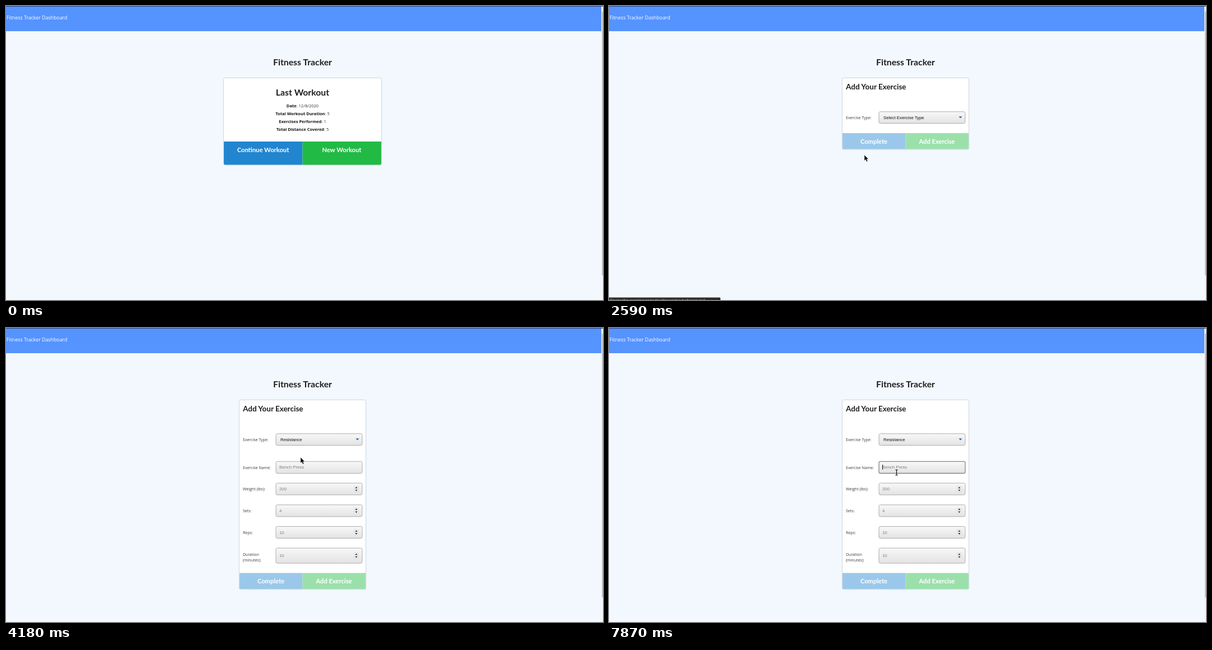
These frames come from a looping animation (1066x525 px, 8 s). An HTML page:

```html
<!DOCTYPE html>
<html lang="en">
<head>
<meta charset="utf-8">
<title>Fitness Tracker</title>
<style>
  html, body { margin: 0; width: 100%; height: 100%; overflow: hidden; background: #f3f8ff; }
  svg { display: block; width: 1066px; height: 525px; }
  .ui { font-family: "Open Sans", "Noto Sans", sans-serif; }
  .head { font-family: Lato, sans-serif; font-weight: 700; fill: #1d1e1f; }
  .field { font-family: "Liberation Sans", Arial, sans-serif; font-size: 7.8px; fill: #808080; }
  .button { font-size: 11.2px; fill: #fff; }
  .mid { text-anchor: middle; }
  .info { font-size: 7.5px; fill: #333; }
  .info tspan { font-weight: 700; fill: #151515; }
  .label { font-size: 7px; fill: #3a3a3a; }
  .card { fill: #fff; filter: drop-shadow(0 .8px 1.3px rgba(60, 70, 85, .48)); }
</style>
</head>
<body>
<svg id="stage" viewBox="0 0 1066 525" xmlns="http://www.w3.org/2000/svg"></svg>
<script>
const LOOP = 8000;
const stage = document.getElementById('stage');

const rect = (x, y, w, h, fill, extra = '') =>
  `<rect x="${x}" y="${y}" width="${w}" height="${h}" fill="${fill}" ${extra}/>`;
const text = (x, y, cls, content, extra = '') =>
  `<text x="${x}" y="${y}" class="${cls}" ${extra}>${content}</text>`;
const head = (x, y, size, content, cls = '') =>
  text(x, y, 'head ' + cls, content, `font-size="${size}"`);
const info = (y, name, value) =>
  text(529.5, y, 'ui info mid', `<tspan>${name}</tspan>: ${value}`);
const label = (y, content) => text(423, y, 'ui label', content);
const box = (y, h, id = '') =>
  rect(482, y, 154, h, 'url(#field)', `rx="2.5" stroke="#acacac" stroke-width="1" ${id}`);
const button = (x, y, content) => text(x, y, 'head button mid', content);

function spinner(y) {
  return rect(621.5, y - 5, 8, 10, '#f0f0f0', 'stroke="#cfcfcf" stroke-width=".5"') +
    `<path d="M623.3 ${y - 1.2}h4.4l-2.2-2.8zM623.3 ${y + 1.2}h4.4l-2.2 2.8z" fill="#333"/>`;
}

function numberRow(name, value, y, h, labelY) {
  const c = y + h / 2;
  return label(labelY, name) + box(y, h) + text(488, c + 2.6, 'field', value) + spinner(c);
}

function formButtons(y) {
  return rect(417, y, 112.5, 28.5, '#9bc8ea') + rect(529.5, y, 112.5, 28.5, '#9be0ab') +
    button(473, y + 18.6, 'Complete') + button(585.5, y + 18.6, 'Add Exercise');
}

stage.innerHTML = `
  <defs>
    <linearGradient id="field" x2="0" y2="1">
      <stop offset="0" stop-color="#f8f8f8"/><stop offset="1" stop-color="#e3e3e3"/>
    </linearGradient>
    <clipPath id="cardClip"><rect x="389" y="129" width="281" height="154.5" rx="2"/></clipPath>
  </defs>
  ${rect(0, 0, 1066, 525, '#f3f8ff')}
  ${rect(0, 0, 1063, 45, '#5593ff')}
  ${rect(1063, 0, 3, 525, '#f4f4f5')}
  ${rect(1064, 10, 2, 471, '#c1c2c4')}
  ${rect(0, 0, 1066, 1, '#2c4271')}
  ${text(1, 24, 'ui', 'Fitness Tracker Dashboard', 'font-size="8.8" fill="#fff"')}
  ${head(529.5, 106.3, 15.8, 'Fitness Tracker', 'mid')}

  <g id="home">
    <rect class="card" x="389" y="129" width="281" height="154.5" rx="2"/>
    ${head(529.5, 159.6, 15.8, 'Last Workout', 'mid')}
    ${info(180.6, 'Date', '12/8/2020')}
    ${info(194.6, 'Total Workout Duration', 5)}
    ${info(208.6, 'Exercises Performed', 1)}
    ${info(222.6, 'Total Distance Covered', 5)}
    <g clip-path="url(#cardClip)">
      ${rect(389, 242, 140.5, 42, '#2185d0', 'id="blue"')}
      ${rect(529.5, 242, 140.5, 42, '#21ba45', 'id="green"')}
    </g>
    ${button(459, 260.8, 'Continue Workout')}
    ${button(599.5, 260.8, 'New Workout')}
  </g>

  <g id="form">
    <rect class="card" id="formCard" x="417" y="129" width="225" rx="2"/>
    ${head(423, 149, 13.5, 'Add Your Exercise')}
    ${label(202.4, 'Exercise Type:')}
    ${box(188.8, 20.7, 'id="select"')}
    ${text(490, 201.8, 'field', '', 'id="choice" style="fill:#111"')}
    <path d="M624.5 197.3h6l-3 3.2z" fill="#2a62a6"/>
    <g id="short">${formButtons(227)}</g>
    <g id="long">
      ${label(251.7, 'Exercise Name:')}
      ${box(238.3, 21.2, 'id="name"')}
      ${text(488, 251.2, 'field', 'Bench Press')}
      ${rect(488, 244, 1, 9, '#111', 'id="caret"')}
      ${numberRow('Weight (lbs):', 200, 277, 21, 290.4)}
      ${numberRow('Sets:', 4, 315.8, 21, 329.2)}
      ${numberRow('Reps:', 10, 354.4, 21, 367.9)}
      ${numberRow('Duration', 10, 393, 27, 406.6)}
      ${label(417.4, '(minutes):')}
      ${formButtons(437.5)}
    </g>
  </g>

  <g id="status">
    <path d="M0 520.5H197.5Q199 520.5 199 522V525H0z" fill="#2e2e2e"/>
    ${text(1, 528.2, 'ui', 'Opens the exercise page for the workout chosen last', 'font-size="7" fill="#c4c4c4"')}
  </g>

  <circle id="click" r="5.8" fill="#f2e413" opacity=".8"/>
  <g id="pointer">
    <path id="arrow" d="M0 0V10.2L2.3 8.1L4 12L5.9 11.2L4.2 7.4H7.2Z" fill="#080808" stroke="#fff" stroke-width=".35"/>
    <path id="hand" d="M-1.2 .5Q0-.7 1 .5L1.3 4.2L4.8 5Q5.7 5.4 5.5 7L4.6 10.3V12H-.8V10.6L-3.5 7.2Q-3.8 5.8-2.6 6L-1.2 7.2Z" fill="#080808" stroke="#fff" stroke-width=".35"/>
    <path id="beam" d="M-2.2-4.8H-.5L0-4.3L.5-4.8H2.2M0-4.3V4.3M-2.2 4.8H-.5L0 4.3L.5 4.8H2.2" fill="none" stroke="#080808" stroke-width="1.1"/>
  </g>`;

const el = Object.fromEntries([...stage.querySelectorAll('[id]')].map(n => [n.id, n]));

// time, x, y of the pointer's hot spot
const path = [
  [160, 953, 481], [310, 638, 343], [490, 638, 343], [1280, 582, 278], [1510, 582, 278],
  [2260, 456, 266], [2640, 456, 266], [3380, 535, 200], [3560, 535, 200], [3850, 526, 236],
  [4030, 526, 236], [4180, 526, 231], [4250, 526, 231], [4650, 513, 246], [4800, 513, 246],
  [4870, 512.5, 253], [5020, 513.5, 258], [LOOP, 513.5, 258]
];
const clicks = [[2260, 2400], [3400, 3560], [4000, 4110], [4670, 4790]];
const PAGE = 2360, CHOSEN = 4060, FOCUS = 4670, BLUR = 4110;
const caretFlips = [5200, 5760, 6290, 6800, 7360, 7870];

const within = (t, a, b) => t >= a && t < b;
const clamp = v => Math.max(0, Math.min(1, v));
const show = (node, on) => node.setAttribute('visibility', on ? 'inherit' : 'hidden');

function pointerAt(t) {
  const i = Math.max(1, path.findIndex(k => k[0] > t));
  const [t0, x0, y0] = path[i - 1], [t1, x1, y1] = path[i];
  const p = clamp((t - t0) / (t1 - t0));
  const e = p * p * (3 - 2 * p);
  return [x0 + (x1 - x0) * e, y0 + (y1 - y0) * e];
}

const blend = (a, b, p) => `rgb(${a.map((v, i) => Math.round(v + (b[i] - v) * p))})`;
const hover = (t, on, off) => clamp((t - on) / 100) - clamp((t - off) / 100);

function focusBox(node, on) {
  node.setAttribute('stroke', on ? '#858585' : '#acacac');
  node.setAttribute('stroke-width', on ? 1.3 : 1);
}

function draw(t) {
  const [x, y] = pointerAt(t);
  const onForm = t >= PAGE, long = t >= CHOSEN;

  show(el.home, !onForm);
  show(el.form, onForm);
  show(el.short, !long);
  show(el.long, long);
  el.formCard.setAttribute('height', long ? 337 : 126.5);
  el.choice.textContent = long ? 'Resistance' : 'Select Exercise Type';
  el.green.setAttribute('fill', blend([33, 186, 69], [22, 171, 57], hover(t, 1230, 1840)));
  el.blue.setAttribute('fill', blend([33, 133, 208], [22, 120, 194], hover(t, 1840, LOOP)));
  focusBox(el.select, within(t, 3400, BLUR));
  focusBox(el.name, t >= FOCUS);
  show(el.caret, t >= FOCUS && caretFlips.filter(f => t >= f).length % 2 === 0);
  show(el.status, within(t, 1700, 3180));

  const overField = long && y >= 238;
  const overLink = !onForm && y < 283.5;
  show(el.pointer, t >= 160);
  show(el.beam, overField);
  show(el.hand, overLink);
  show(el.arrow, !overField && !overLink);
  el.pointer.setAttribute('transform', `translate(${x} ${y})`);

  show(el.click, clicks.some(([a, b]) => within(t, a, b)));
  el.click.setAttribute('cx', x + .5);
  el.click.setAttribute('cy', y + 1);
}

const start = performance.now();
function tick() {
  draw((performance.now() - start) % LOOP);
  requestAnimationFrame(tick);
}
tick();
</script>
</body>
</html>
```
